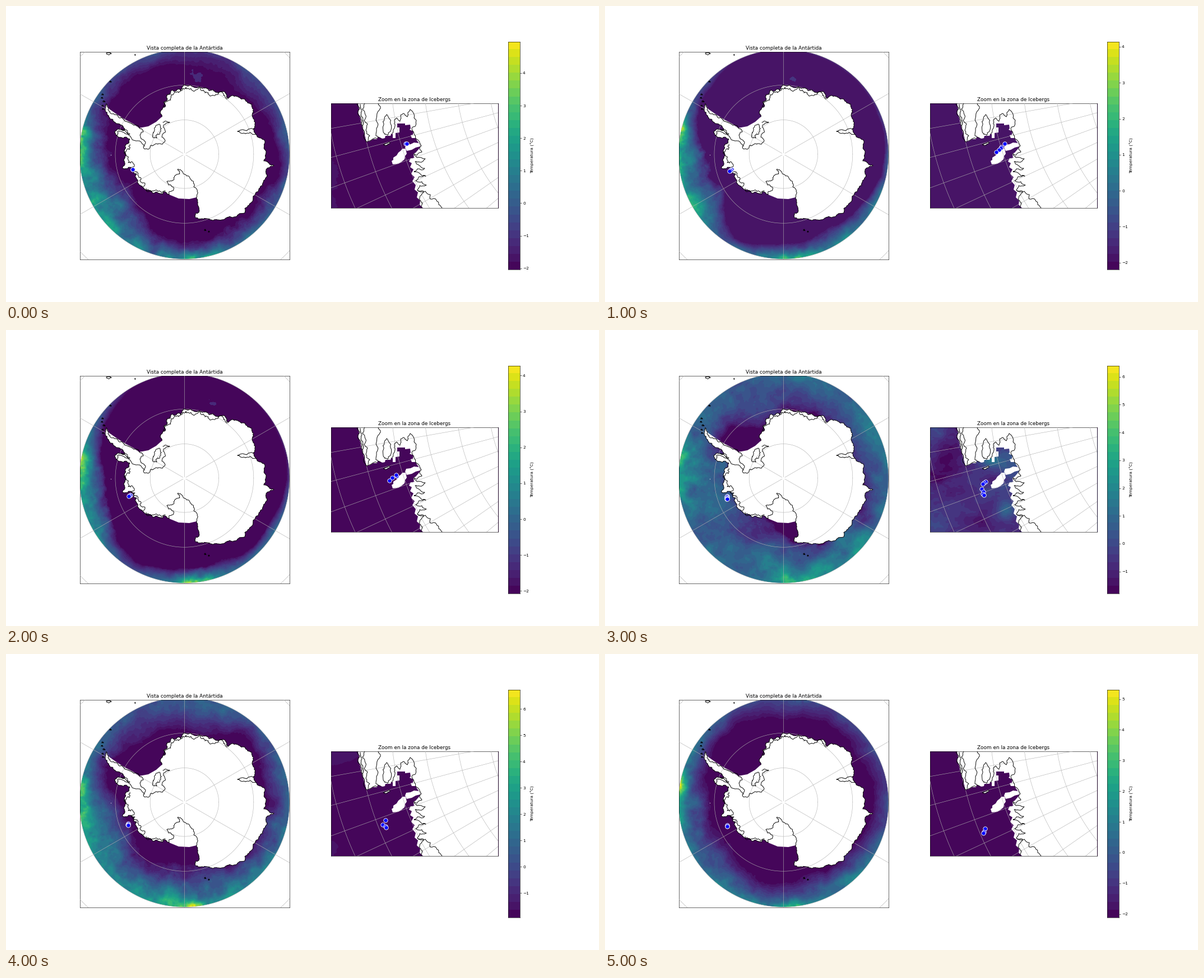
These frames come from a looping animation (1058x529 px, 6000 ms). A matplotlib script:

```python
import numpy as np
import matplotlib.pyplot as plt
from matplotlib.animation import FuncAnimation
from matplotlib.patches import Circle, Polygon
from matplotlib.ticker import MultipleLocator

W, H = 1058, 529
BANDS = 29
POLE, SCALE = np.array([318.4, 264.8]), 700
ZOOM_POLE, ZOOM = np.array([1146, 119]), 4.67
MAP_BOX = (132.25, 82.3, 505.5, 452.5)
ZOOM_BOX = (579.5, 174, 878, 361)
BAR_BOX = (896.3, 63.6, 917, 470.8)

# Temperature range of each step
RANGES = [(-2.036, 4.97), (-2.187, 4.146), (-2.067, 4.276),
          (-1.79, 6.406), (-1.925, 6.733), (-2.11, 5.308)]
BASE = [-1.93, -1.85, -1.95, -1.62, -1.85, -1.95]
POWER = [1.1, 0.8, 0.8, 0.5, 0.85, 1.0]
HOT = [1.7, 1.6, 1.6, 2.2, 2.0, 1.6]

# Warming at the rim and width of the warm belt, every 30 degrees from east, clockwise
RIM = [[1.8, 2.4, 2.6, 2.6, 2.6, 3.3, 3.8, 2.6, 1.3, 1.0, 1.3, 1.4],
       [1.3, 2.0, 2.4, 2.4, 1.2, 3.0, 3.4, 1.6, .5, .3, .4, .6],
       [1.0, 1.8, 2.2, 2.6, 1.2, 2.8, 3.4, 1.6, .3, .3, .3, .4],
       [2.8, 3.2, 3.6, 3.4, 2.5, 3.0, 3.8, 3.0, 2.1, 2.5, 2.9, 2.8],
       [2.6, 3.5, 3.6, 4.0, 3.8, 4.0, 4.0, 3.2, 1.9, 2.1, 2.4, 2.7],
       [2.0, 2.4, 2.8, 2.8, 2.6, 2.8, 3.6, 2.6, 1.5, 1.6, 1.5, 1.5]]
BELT = [[20, 34, 42, 30, 48, 80, 66, 38, 26, 30, 42, 34],
        [7, 18, 27, 24, 12, 62, 52, 18, 3, 3, 4, 6],
        [5, 15, 22, 24, 12, 40, 46, 18, 3, 3, 3, 4],
        [52, 55, 60, 90, 108, 105, 100, 60, 85, 70, 65, 58],
        [42, 48, 58, 70, 78, 88, 82, 50, 65, 65, 55, 45],
        [30, 40, 46, 38, 50, 62, 58, 38, 30, 40, 38, 36]]

# Iceberg positions in the zoomed map
BERGS = [[(713, 246), (714.5, 245.7)],
         [(713, 246), (707, 252), (705.5, 254), (703, 257.5), (697.5, 261.5)],
         [(697, 261.5), (695.5, 259.5), (688.5, 264), (684, 269)],
         [(679, 271.5), (676, 273), (673.5, 275), (671.5, 284.5), (675, 289.5),
          (674, 293.5), (676, 295)],
         [(676.7, 297), (671.5, 305), (677, 308), (678, 310)],
         [(677.5, 312), (675.5, 318.5), (675, 320)]]


def points(*flat):
    return np.reshape(np.array(flat, float), (-1, 2))


def rough(path, amount=0.22, depth=3, seed=1):
    """Midpoint displacement of a polyline."""
    rng = np.random.default_rng(seed)
    for _ in range(depth):
        step = np.diff(path, axis=0)
        normal = np.column_stack([-step[:, 1], step[:, 0]])
        mid = path[:-1] + step / 2 + normal * rng.uniform(-amount, amount, (len(step), 1))
        out = np.empty((2 * len(path) - 1, 2))
        out[::2], out[1::2] = path, mid
        path = out
    return path


def noise(shape, seed, first=5, octaves=6):
    """Fractal value noise with zero mean and unit deviation."""
    rng = np.random.default_rng(seed)
    total = np.zeros(shape)
    for k in range(octaves):
        n = first * 2 ** k
        grid = rng.normal(size=(n + 1, n + 1))
        rows, cols = (np.linspace(0, n - 1e-6, s) for s in shape)
        i, j = rows.astype(int), cols.astype(int)
        u, v = rows - i, cols - j
        u, v = (u * u * (3 - 2 * u))[:, None], v * v * (3 - 2 * v)
        top = grid[i][:, j] * (1 - v) + grid[i][:, j + 1] * v
        low = grid[i + 1][:, j] * (1 - v) + grid[i + 1][:, j + 1] * v
        total += (top * (1 - u) + low * u) * 0.62 ** k
    return (total - total.mean()) / total.std()


def mesh(box):
    x0, y0, x1, y1 = box
    return np.meshgrid(np.linspace(x0, x1, round(x1 - x0)),
                       np.linspace(y0, y1, round(y1 - y0)))


def blob(x, y, cx, cy, sx, sy):
    return np.exp(-((x - cx) / sx) ** 2 - ((y - cy) / sy) ** 2)


def banded(temp, k):
    lo, hi = RANGES[k]
    index = np.clip((temp - lo) / (hi - lo) * BANDS, 0, BANDS - 1)
    return (np.floor(index) + 0.5) / BANDS


def ocean(k):
    x, y = mesh(MAP_BOX)
    dx, dy = x - POLE[0], y - POLE[1]
    angle = np.degrees(np.arctan2(dy, dx)) % 360
    turn = np.arange(0, 360, 30)
    rim = np.interp(angle, turn, RIM[k], period=360)
    belt = np.interp(angle, turn, BELT[k], period=360)
    swirl, grain = noise(x.shape, 10 + k), noise(x.shape, 30 + k, 14, 4)
    depth = 187.5 - np.hypot(dx, dy) + belt * 0.13 * swirl
    warm = np.clip(1 - depth / belt, 0, 1.2) ** POWER[k]
    temp = BASE[k] + rim * warm * (1 + 0.11 * grain)
    spots = (blob(x, y, 134, 232, 13, 24) + 0.6 * blob(x, y, 134, 288, 11, 20)
             + 1.2 * blob(x, y, 340, 453, 30, 12))
    temp += HOT[k] * spots * (1 + 0.3 * grain)
    if k < 3:
        temp += 0.7 * (grain * blob(x, y, 355, 118, 42, 20) > 0.95 + 0.2 * k)
    if k == 3:
        temp -= 1.0 * blob(x, y, 278, 362, 34, 16) + 1.3 * blob(x, y, 235, 192, 45, 28)
        temp += 1.4 * blob(x, y, 213, 242, 10, 14) + 0.8 * blob(x, y, 218, 300, 18, 18)
    if k == 4:
        temp -= 0.6 * blob(x, y, 235, 185, 45, 28)
    return banded(temp, k)


def bay(k):
    x, y = mesh(ZOOM_BOX)
    swirl = noise(x.shape, 50 + k, 4, 5)
    temp = BASE[k] + (0.04 if k in (0, 4) else 0) * swirl
    if k == 0:
        temp += 0.2 * blob(x, y, 570, 320, 38, 90)
    if k == 3:
        temp = (-0.5 + 0.25 * swirl - 0.85 * blob(x, y, 608, 235, 50, 58)
                - 0.8 * blob(x, y, 670, 348, 45, 20) + 1.8 * blob(x, y, 716, 322, 18, 18)
                + 1.7 * blob(x, y, 688, 234, 18, 12) + 0.5 * blob(x, y, 715, 235, 25, 25)
                + 0.7 * blob(x, y, 588, 178, 25, 15))
    if k == 4:
        temp += 0.5 * blob(x, y, 585, 176, 45, 24) + 0.3 * blob(x, y, 575, 350, 25, 22)
    return banded(temp, k)


def box_axes(box, title=""):
    x0, y0, x1, y1 = box
    ax = fig.add_axes([x0 / W, 1 - y1 / H, (x1 - x0) / W, (y1 - y0) / H])
    ax.set_title(title)
    return ax


def map_axes(box, title):
    x0, y0, x1, y1 = box
    ax = box_axes(box, title)
    image = ax.imshow([[0]], extent=(x0, x1, y1, y0), cmap="viridis", vmin=0, vmax=1,
                      aspect="auto", interpolation="nearest")
    ax.set(xlim=(x0, x1), ylim=(y1, y0), xticks=[], yticks=[])
    return ax, image


def graticule(ax, pole, scale, lats, step, gap=3):
    style = dict(color="#b0b0b0", lw=0.8, zorder=3)
    turn = np.radians(np.linspace(0, 360, 721))
    for lat in lats:
        r = scale * np.tan(np.radians((90 - lat) / 2))
        ax.plot(pole[0] + r * np.cos(turn), pole[1] + r * np.sin(turn), **style)
    for a in np.radians(np.arange(30, 390, step)):
        r = np.array([gap, scale * 0.6])
        ax.plot(pole[0] + r * np.cos(a), pole[1] + r * np.sin(a), **style)


def land(ax, path):
    ax.add_patch(Polygon(path, fc="white", ec="none", zorder=2))


def shore(ax, *paths, width=1.25):
    for path in paths:
        ax.plot(*path.T, color="black", lw=width, zorder=4)


def icebergs(ax):
    return ax.scatter([], [], s=100, c="blue", edgecolors="white", linewidths=1.2, zorder=5)


fig = plt.figure(figsize=(20, 10), dpi=52.9)

# Whole continent
ax_map, sea = map_axes(MAP_BOX, "Vista completa de la Antártida")
sea.set_clip_path(Circle(POLE, 187.5, transform=ax_map.transData))
graticule(ax_map, POLE, SCALE, (80, 70, 60, 50), 60)

east = rough(points(
    278, 198, 277, 186, 284, 180, 281, 172, 288, 167, 287, 159, 293, 158, 295, 151, 301, 153,
    306, 149, 312, 150, 317, 141, 324, 143, 330, 142, 337, 146, 345, 144, 356, 146, 362, 151,
    369, 150, 378, 155, 386, 153, 393, 158, 397, 165, 404, 160, 415, 163, 425, 166, 431, 173,
    438, 175, 441, 184, 439, 194, 443, 203, 444, 212, 441, 220, 445, 228, 454, 236, 462, 243,
    460, 254, 464, 262, 463, 272, 460, 277, 469, 281, 478, 285, 468, 289, 464, 292, 466, 302,
    461, 311, 458, 321, 451, 327, 445, 335, 441, 345, 434, 356, 426, 362, 425, 370, 414, 373,
    405, 378, 394, 378, 385, 382, 370, 383, 360, 380, 350, 380, 338, 378, 338, 371, 344, 369,
    342, 356, 340, 342), seed=3)
ross_front = points(340, 342, 327, 345, 308, 344, 291, 337)
west = rough(points(
    291, 337, 284, 332, 279, 336, 271, 334, 262, 334, 255, 329, 248, 328, 243, 322, 237, 319,
    235, 311, 231, 306, 233, 300, 228, 298, 230, 291, 222, 288, 215, 291, 208, 290, 212, 283,
    210, 275, 214, 267, 211, 258, 213, 249, 219, 245, 221, 238, 214, 234, 205, 235, 197, 231,
    194, 224, 201, 220, 212, 221, 208, 214, 198, 210, 191, 203, 184, 199, 180, 190, 177, 183,
    179, 175), seed=8)
weddell_front = points(179, 175, 184, 184, 197, 193, 211, 202, 226, 210, 238, 218,
                       254, 215, 268, 207, 278, 198)
land(ax_map, np.vstack([east, ross_front, west, weddell_front]))

peninsula = rough(points(179, 175, 183, 182, 186, 191, 196, 194, 202, 200, 212, 206, 221, 209,
                         229, 213, 238, 218, 245, 225, 239, 231, 242, 238, 249, 243, 245, 252,
                         253, 256, 258, 249, 268, 246, 279, 247, 284, 241, 278, 234, 284, 226,
                         281, 213, 292, 208, 280, 208), seed=5)
berkner = rough(points(263, 226, 267, 215, 273, 211, 277, 219, 274, 229, 268, 231, 269, 236,
                       262, 235, 263, 226), seed=6)
ross = rough(points(340, 342, 341, 331, 335, 323, 334, 313, 326, 304, 315, 296, 306, 292,
                    310, 300, 301, 304, 299, 311, 287, 314, 290, 320, 299, 324, 298, 330,
                    291, 332, 291, 337), seed=7)
amery = rough(points(441, 220, 431, 222, 422, 221, 413, 224, 424, 227, 435, 226, 445, 229),
              seed=9)
strait = rough(points(197, 231, 199, 224, 210, 226, 221, 229, 214, 224, 206, 221, 217, 224,
                      224, 236, 238, 241, 246, 250), seed=10)
inner_north = rough(points(283, 181, 288, 170, 294, 162, 299, 157, 308, 155, 316, 147, 326, 148,
                           338, 150, 352, 150, 361, 155, 374, 158, 388, 160, 395, 166),
                    0.4, seed=12)
inner_west = rough(points(245, 323, 239, 312, 236, 303, 231, 296, 226, 293, 229, 285, 218, 280,
                          215, 268, 216, 256, 221, 247), 0.4, seed=13)
inner_south = rough(points(250, 326, 262, 330, 275, 331, 284, 330), 0.45, seed=14)
shore(ax_map, east, west, peninsula, berkner, ross, amery, strait,
      inner_north, inner_west, inner_south)

islets = [(179, 84, 9), (230, 87, 1), (185, 135, 3), (171, 158, 3), (170, 164, 3),
          (173, 170, 4), (171, 178, 3), (172, 184, 3), (354, 400, 3), (361, 403, 2)]
for n, (x, y, size) in enumerate(islets):
    shore(ax_map, rough(points(x, y, x + size / 2, y - 1, x + size, y + 1, x, y + 1), 0.3, seed=n))
ax_map.plot([187], [266], "o", color="white", ms=1.6, mew=0)

# Zoomed bay
ax_zoom, cove = map_axes(ZOOM_BOX, "Zoom en la zona de Icebergs")
graticule(ax_zoom, ZOOM_POLE, SCALE * ZOOM, range(68, 84, 2), 5)

land(ax_zoom, points(
    628, 174, 630, 184, 628, 190, 632, 200, 634, 210, 637, 220, 640, 231, 643, 243, 650, 241,
    655, 238, 662, 238, 663, 234, 672, 237, 676, 236, 677, 232, 686, 232, 687, 229, 690, 229,
    690, 236, 695, 236, 695, 227, 702, 226, 702, 217, 698, 217, 698, 210, 712, 210, 712, 213,
    721, 212, 722, 219, 720, 221, 727, 224, 726, 230, 722, 231, 724, 236, 731, 236, 733, 240,
    738, 247, 739, 251, 737, 255, 731, 262, 727, 264, 728, 272, 722, 272, 719, 278, 724, 281,
    721, 288, 727, 292, 723, 300, 729, 306, 725, 313, 731, 320, 729, 328, 735, 333, 733, 342,
    739, 348, 738, 355, 744, 361, 878, 361, 878, 174))
land(ax_zoom, points(688, 277, 691, 275, 691, 271, 697, 267, 700, 262, 705, 258, 707, 255,
                     713, 255, 715, 264, 712, 268, 711, 274, 705, 279, 700, 282, 690, 283))
land(ax_zoom, points(712, 253, 714, 248, 722, 247, 728, 244, 737, 245, 739, 251, 731, 253,
                     724, 257, 715, 259))
islet = points(674, 248, 678, 246, 684, 243, 685, 245, 678, 249, 674, 248)
land(ax_zoom, islet)

shore(ax_zoom, rough(islet, seed=20), *(rough(p, 0.2, 2, seed=21 + n) for n, p in enumerate([
    points(627, 174, 631, 182, 628, 190, 633, 200, 634, 211, 640, 228, 643, 243, 651, 240,
           662, 237),
    points(640, 174, 636, 184, 641, 194, 639, 205, 645, 211, 642, 222, 649, 232, 646, 240),
    points(632, 176, 635, 186, 633, 195, 637, 205, 636, 214),
    points(664, 174, 668, 183, 663, 190, 661, 200, 663, 215, 660, 232, 668, 236),
    points(676, 229, 674, 212, 675, 202, 679, 194, 683, 200, 686, 210, 686, 224, 681, 231,
           676, 229),
    points(688, 229, 694, 214, 693, 206, 697, 200, 703, 206, 704, 195, 710, 192, 716, 198,
           721, 185, 725, 188, 728, 200, 732, 205, 730, 215, 724, 219, 728, 228, 731, 237,
           738, 243, 741, 250, 738, 256, 742, 261, 734, 266, 728, 264),
    points(728, 264, 733, 271, 748, 273, 738, 279, 730, 278, 736, 284, 747, 290, 734, 291,
           728, 296, 738, 299, 749, 304, 737, 305, 731, 312, 742, 314, 750, 320, 738, 321,
           734, 329, 745, 331, 741, 338, 737, 345, 743, 352, 741, 361),
    points(734, 329, 748, 331, 757, 337, 757, 345, 768, 347, 772, 355, 778, 361),
])))

# Colour scale
ax_bar = box_axes(BAR_BOX)
bar = ax_bar.imshow((np.arange(BANDS)[:, None] + 0.5) / BANDS, cmap="viridis", vmin=0, vmax=1,
                    origin="lower", aspect="auto", interpolation="nearest")
ax_bar.set_xticks([])
ax_bar.yaxis.tick_right()
ax_bar.yaxis.set_label_position("right")
ax_bar.yaxis.set_major_locator(MultipleLocator(1))
ax_bar.set_ylabel("Temperatura (°C)")

map_dots, zoom_dots = icebergs(ax_map), icebergs(ax_zoom)


def draw(k):
    sea.set_data(ocean(k))
    cove.set_data(bay(k))
    spots = np.array(BERGS[k])
    zoom_dots.set_offsets(spots)
    map_dots.set_offsets((spots - ZOOM_POLE) / ZOOM + POLE)
    lo, hi = RANGES[k]
    bar.set_extent((0, 1, lo, hi))
    ax_bar.set(xlim=(0, 1), ylim=(lo, hi))
    return sea, cove, bar, zoom_dots, map_dots


anim = FuncAnimation(fig, draw, frames=6, interval=1000, repeat=True, repeat_delay=0)
plt.show()
```
